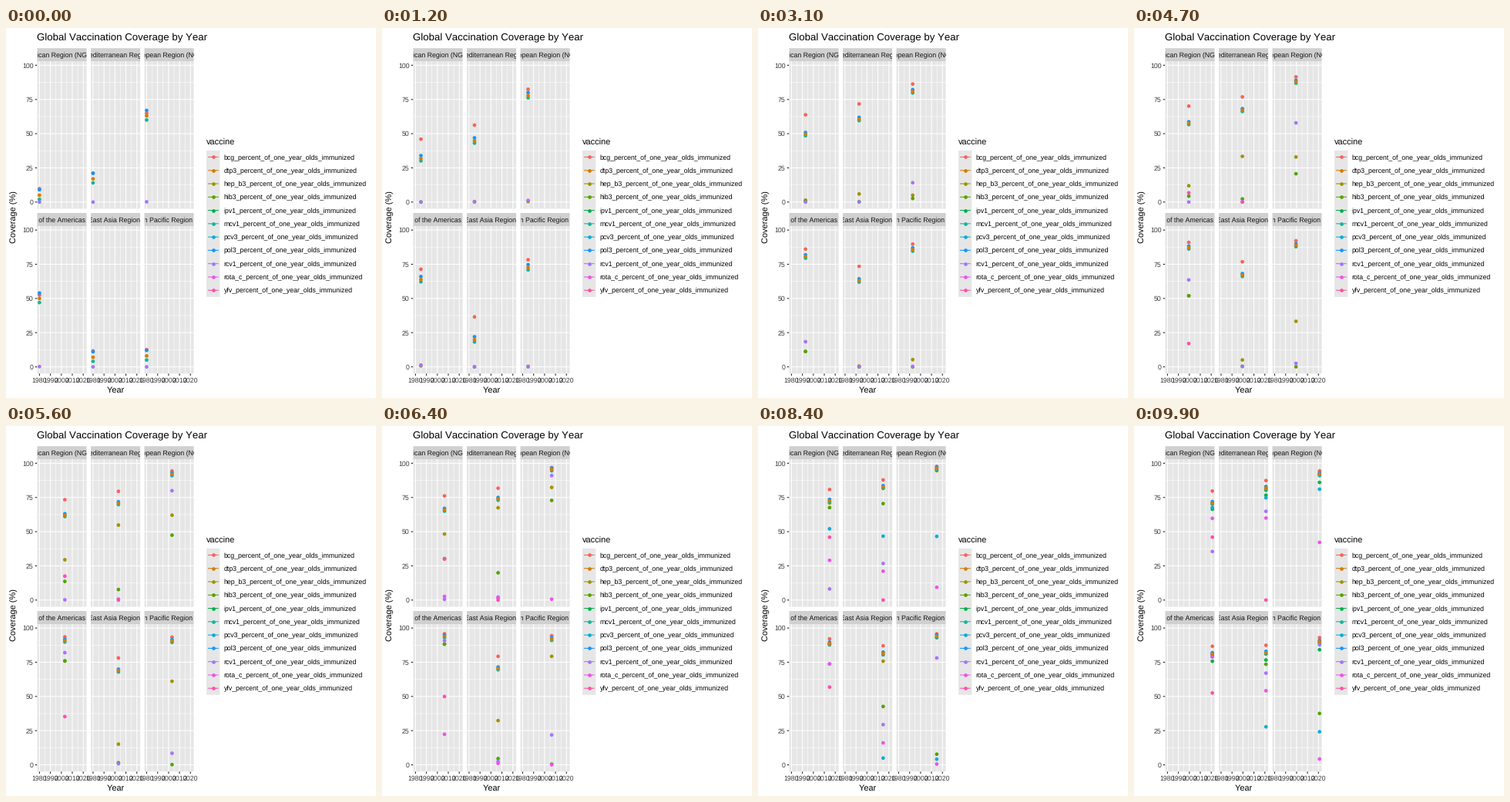
Animation of 480x480 px, one loop 10000 ms. Source, as a matplotlib script:

```python
import matplotlib.pyplot as plt
import numpy as np
from matplotlib.animation import FuncAnimation
from matplotlib.patches import Rectangle

plt.rcParams["font.family"] = "Liberation Sans"
plt.rcParams["text.hinting"] = "none"
plt.rcParams["text.kerning_factor"] = 6  # practically no kerning

FRAMES = 100
FIRST, LAST = 1980, 2021
PANEL_W, PANEL_H, STRIP_H, GAP = 64.05, 191.3, 17.0, 5.48
LEFT, TOP = 40.5, 26.2
X_SCALE = PANEL_W / (1.1 * (LAST - FIRST))
Y_SCALE = PANEL_H / (1.1 * 98)
LINE, DOT = 1.07, 22

COLORS = {
    "bcg": "#f6635a", "dtp3": "#d47d00", "hep_b3": "#a09200", "hib3": "#51a400",
    "ipv1": "#00b149", "mcv1": "#14b598", "pcv3": "#0cadd7", "pol3": "#1495ff",
    "rcv1": "#a573ff", "rota_c": "#ec54e7", "yfv": "#ff50a9",
}
ORDER = ["bcg", "hep_b3", "hib3", "ipv1", "mcv1", "pcv3",
         "pol3", "rcv1", "rota_c", "yfv", "dtp3"]

# Each region has one basic coverage curve through these years
CORE_YEARS = [FIRST, 1985, 1993, 2006.5, 2019]
REGIONS = [
    ("African", [5, 32, 50, 66, 76]),
    ("Eastern Mediterranean", [17, 45, 61, 74, 87]),
    ("European", [63, 78, 81, 95.5, 97]),
    ("Region of the Americas", [50, 64, 81, 94, 86]),
    ("South-East Asia", [7, 20, 64, 70.5, 87]),
    ("Western Pacific", [8, 73, 86, 92, 95]),
]
# Later vaccines: first year, share of the basic curve reached at last,
# and the year each region is half way there (None: not given)
ROLLOUT = {
    "hep_b3": (1983, 1, [2003.5, 1999.5, 2001, 1998.3, 2007, 2001]),
    "hib3": (1990, 1, [2007, 2009.5, 2003, 1998.3, 2014.5, 2022]),
    "ipv1": (2015, 1, [2013] * 6),
    "pcv3": (2008, 1, [2012, 2014, 2015, 2010, 2023, 2024]),
    "rcv1": (FIRST, 1, [2021, 2017, 1997.5, 1996.5, 2016.5, 2010]),
    "rota_c": (2006, 1, [2016, 2018, 2021.5, 2010, 2019, 2030]),
    "yfv": (1997, 0.65, [2004, 2080, None, 2002, None, None]),
}


def coverage(k, name, year):
    """Percent covered in region k, or None while the vaccine is not in use."""
    core = np.interp(year, CORE_YEARS, REGIONS[k][1]) - 2.5 * max(0, year - 2019)
    early = np.exp((FIRST - year) / 5)
    if name == "bcg":
        return core + (0.3 - 0.25 * early) * (100 - core)
    if name == "pol3":
        return core + 1 + 3 * early
    if name == "mcv1":
        return core - 1 - 2 * early
    if name in ROLLOUT:
        start, share, middles = ROLLOUT[name]
        if year < start or middles[k] is None:
            return None
        return core * share / (1 + np.exp((middles[k] - year) / 3))
    return core


fig = plt.figure(figsize=(480 / 72, 480 / 72), dpi=72, facecolor="white")
ax = fig.add_axes([0, 0, 1, 1])
ax.set(xlim=(0, 480), ylim=(480, 0))
ax.axis("off")


def box(x, y, w, h, color):
    patch = Rectangle((x, y), w, h, fc=color, ec="none", lw=0, snap=False, zorder=1)
    return ax.add_patch(patch)


def line(x0, y0, x1, y1, color="white", width=LINE, z=2.0):
    ax.plot([x0, x1], [y0, y1], color=color, lw=width, zorder=z,
            solid_capstyle="butt", snap=False)


def label(x, y, text, size=8.8, color="black", **kw):
    return ax.text(x, y, text, fontsize=size, color=color, zorder=4, **kw)


def panel_origin(k):
    row, col = divmod(k, 3)
    return (LEFT + col * (PANEL_W + GAP),
            TOP + STRIP_H + row * (PANEL_H + STRIP_H + GAP))


def to_xy(k, year, value):
    x, y = panel_origin(k)
    return (x + PANEL_W / 22 + (year - FIRST) * X_SCALE,
            y + PANEL_H * 21 / 22 - value * Y_SCALE)


def draw_panel(k, name):
    x, y = panel_origin(k)
    right, bottom = x + PANEL_W, y + PANEL_H
    box(x, y, PANEL_W, PANEL_H, "#e6e6e6")
    strip = box(x, y - STRIP_H, PANEL_W, STRIP_H, "#d0d0d0")
    region = name if name.startswith("Region") else name + " Region"
    text = label(x + PANEL_W / 2, y - STRIP_H / 2 + 3.2, region + " (NGW)",
                 color="#111111", ha="center", clip_on=True)
    text.set_clip_path(strip)

    for year in range(1980, 2025, 5):
        gx = to_xy(k, year, 0)[0]
        major = year % 10 == 0
        line(gx, y, gx, bottom, width=LINE if major else LINE / 2, z=2.1 if major else 2)
        if major and k >= 3:
            line(gx, bottom, gx, bottom + 2.74, "#242424")
            label(gx, bottom + 11.5, str(year), color="#3c3c3c", ha="center")
    for value in np.arange(0, 101, 12.5):
        gy = to_xy(k, FIRST, value)[1]
        major = value % 25 == 0
        line(x, gy, right, gy, width=LINE if major else LINE / 2, z=2.1 if major else 2)
        if major and k % 3 == 0:
            line(x - 2.74, gy, x, gy, "#242424")
            label(x - 4.9, gy + 3.2, f"{value:.0f}", color="#3c3c3c", ha="right")


def draw_legend(x=260.1, y=158.8, key=17.28):
    label(x, y - 6.8, "vaccine", size=11)
    box(x, y, key, key * len(COLORS), "#e6e6e6")
    for n, (name, color) in enumerate(COLORS.items()):
        cy = y + (n + 0.5) * key
        line(x + 0.1 * key, cy, x + 0.9 * key, cy, color)
        ax.scatter([x + key / 2], [cy], s=DOT, color=color, linewidths=0, zorder=3)
        label(x + key + 5.5, cy + 3.2, name + "_percent_of_one_year_olds_immunized")


for k, (name, _) in enumerate(REGIONS):
    draw_panel(k, name)
draw_legend()
label(LEFT, 16, "Global Vaccination Coverage by Year", size=13.2)
label(LEFT + 1.5 * PANEL_W + GAP, 472.6, "Year", size=11, ha="center")
label(16.4, 245.4, "Coverage (%)", size=11, rotation=90, ha="right", va="center")

dots = ax.scatter([], [], s=DOT, linewidths=0, zorder=3)


def update(i):
    year = FIRST + (LAST - FIRST) * i / (FRAMES - 1)
    spots, colors = [], []
    for k in range(len(REGIONS)):
        for name in ORDER:
            value = coverage(k, name, year)
            if value is not None:
                spots.append(to_xy(k, year, value))
                colors.append(COLORS[name])
    dots.set_offsets(spots)
    dots.set_facecolors(colors)
    return [dots]


anim = FuncAnimation(fig, update, frames=FRAMES, interval=100, repeat=True, repeat_delay=0)
plt.show()
```
